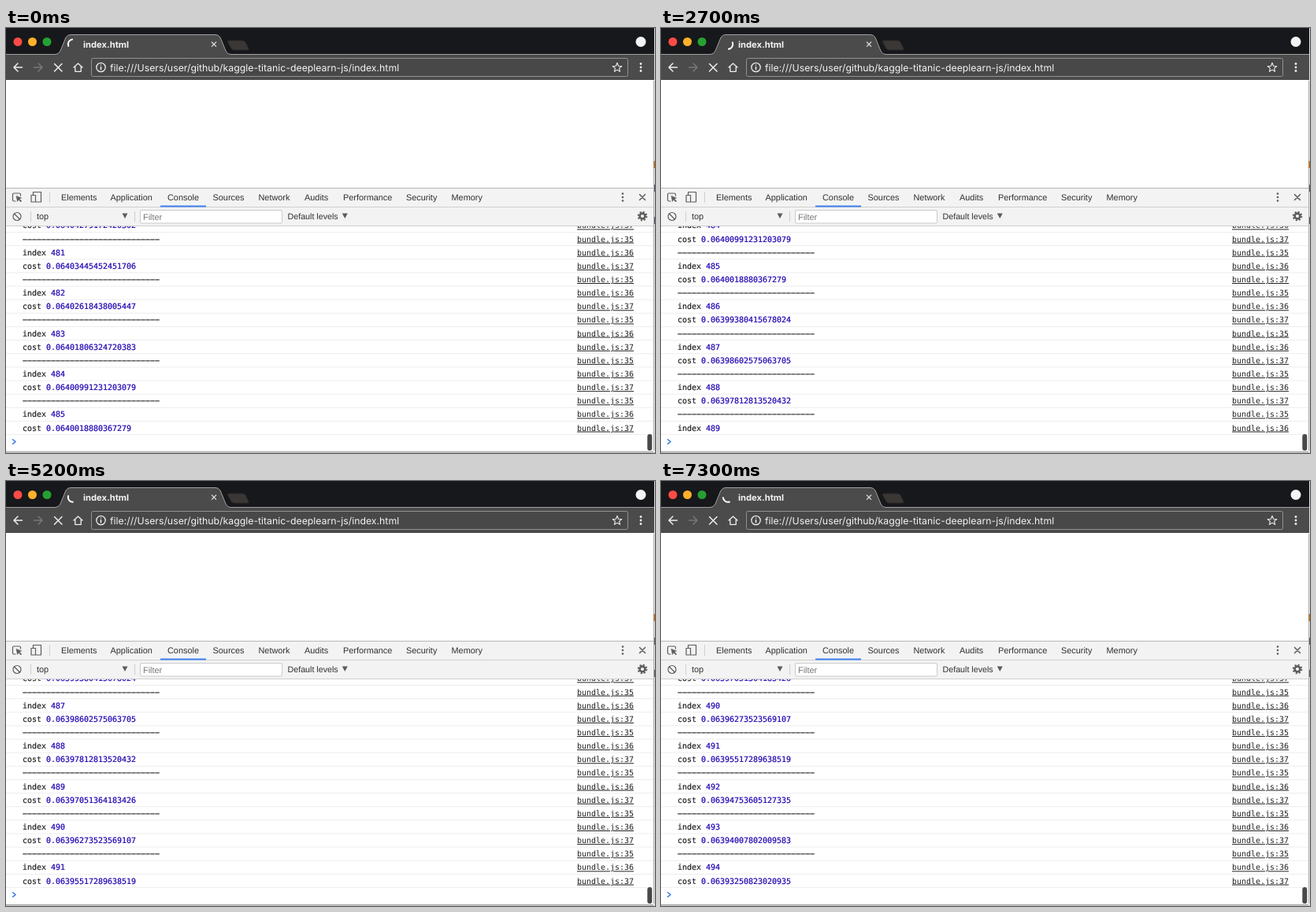
Write an HTML page that moves like this. It is 824 px wide and 540 px high and loops after 7.4 s.

```html
<!DOCTYPE html>
<html lang="en">
<head>
<meta charset="utf-8">
<title>index.html</title>
<style>
  html, body { margin: 0; width: 100%; height: 100%; overflow: hidden; background: #fff; }
  svg { display: block; }
  text { font: 10.9px "Liberation Sans", Arial, sans-serif; fill: #303030; white-space: pre; text-rendering: geometricPrecision; }
  .chrome { font-family: Inter, Roboto, sans-serif; fill: #f4f4f4; }
  .title { font-size: 11.2px; font-weight: 700; }
  .url { font-size: 12.3px; }
  #rows text { font: 9.97px "DejaVu Sans Mono", "Liberation Mono", monospace; fill: #222; stroke: #222; stroke-width: .2px; }
  #rows .number { fill: #1c00b0; stroke: #1c00b0; }
  #rows .link { text-decoration: underline; stroke: none; }
  .line { fill: none; stroke-linecap: round; stroke-linejoin: round; }
</style>
</head>
<body>
<svg width="824" height="540" viewBox="0 0 824 540">
  <rect width="824" height="540" fill="#fff"/>

  <!-- Title bar and tab -->
  <rect width="823" height="34" fill="#17181b"/>
  <rect y="33" width="823" height="33" fill="#4b4b4b"/>
  <path d="M0 33.500H63Q67 33 69 29L76 12Q78 8.500 82 8.500H266Q270 8.500 272 12L279 29Q281 33.500 285 33.500H823" fill="#4b4b4b" stroke="#a0a0a0"/>
  <path d="M66 34H283" stroke="#4b4b4b" stroke-width="2"/>
  <path d="M283 16H300Q303 16 304 18L308 26Q309 28 306 28H290Q287 28 286 26L281.500 18Q281 16 283 16Z" fill="#3b3735" stroke="#2a2828"/>
  <circle cx="15" cy="17.500" r="5.500" fill="#fc4b46"/>
  <circle cx="33.500" cy="17.500" r="5.500" fill="#fdb12b"/>
  <circle cx="52" cy="17.500" r="5.500" fill="#25a032"/>
  <path id="spinner" class="line" d="M80.150 16.740A6.200 6.200 0 0 1 89.850 16.740" stroke="#fff" stroke-width="2"/>
  <text class="chrome title" x="98" y="24.500">index.html</text>
  <path class="line" d="M261.300 18l5.400 5.400m0-5.400l-5.400 5.400" stroke="#ddd" stroke-width="1.200"/>
  <circle cx="806" cy="17.500" r="6.500" fill="#f4f4f4"/>

  <!-- Navigation bar -->
  <rect x="108.500" y="38.500" width="681" height="23" rx="2" fill="#484848" stroke="#929292"/>
  <g class="line" stroke="#eee" stroke-width="1.500">
    <path d="M20.500 50H10M15 45l-5 5 5 5"/>
    <path d="M35.500 50H46M41 45l5 5-5 5" stroke="#777"/>
    <path d="M61.500 45.500l9.500 9.500m0-9.500l-9.500 9.500"/>
    <path d="M86 50L91.500 45 97 50M87.800 49V55.300H95.200V49" stroke-width="1.300"/>
    <circle cx="120.500" cy="50" r="5.700" stroke-width="1.300"/>
    <path d="M120.500 49.500v3.300M120.500 47v.1"/>
    <path d="M776 44.300l1.600 3.900 4.200.300-3.200 2.700 1 4.100-3.600-2.200-3.600 2.200 1-4.100-3.200-2.700 4.200-.300Z" stroke-width="1.100"/>
  </g>
  <text class="chrome url" x="132" y="54.600">file:///Users/user/github/kaggle-titanic-deeplearn-js/index.html</text>
  <g fill="#eee"><circle cx="806" cy="45.500" r="1.400"/><circle cx="806" cy="50" r="1.400"/><circle cx="806" cy="54.500" r="1.400"/></g>

  <!-- Developer tools bars -->
  <rect y="203" width="822" height="49" fill="#f3f3f3"/>
  <path d="M0 203.500H822" stroke="#b5b5b5"/>
  <path d="M0 227.500H822M0 251.500H822M55.500 208V222M31.500 233V246M163.500 233V246" stroke="#cfcfcf"/>
  <rect x="196" y="225.500" width="58" height="2" fill="#3e82f1"/>
  <g class="line" stroke="#5c5c5c" stroke-width="1.200">
    <path d="M12 220H10Q8.500 220 8.500 218.500V211.500Q8.500 210 10 210H17Q18.500 210 18.500 211.500V213"/>
    <path d="M13 213.500l1.500 7 1.500-2.300 2.800 2.800 1-1-2.800-2.800 2.500-1.200Z" fill="#5c5c5c" stroke-width=".5"/>
    <path d="M34.500 212V208.500H44.500V221H38M32 212.500H37.500V221H32Z"/>
    <path d="M804.500 211.500l7 7m0-7l-7 7" stroke-width="1.500"/>
    <circle cx="14" cy="239.500" r="5"/><path d="M10.500 236l7 7"/>
    <circle cx="808" cy="239" r="3.400" stroke-width="2.600"/>
    <circle cx="808" cy="239" r="5.300" stroke-width="2" stroke-dasharray="2.080 2.080" style="stroke-linecap:butt"/>
  </g>
  <g fill="#5c5c5c">
    <circle cx="783" cy="210.500" r="1.300"/><circle cx="783" cy="215" r="1.300"/><circle cx="783" cy="219.500" r="1.300"/>
    <path d="M147.500 235.500h7l-3.500 6.500ZM426.800 235.500h7l-3.500 6.500Z"/>
  </g>
  <g id="tabs"></g>
  <rect x="170.500" y="231.500" width="180" height="16.500" rx="1.500" fill="#fff" stroke="#cbcbcb"/>
  <text x="39" y="243">top</text>
  <text x="174" y="243.500" style="fill:#777">Filter</text>
  <text x="357.500" y="243" style="font-size:10.700px">Default levels</text>

  <!-- Console -->
  <svg y="252" width="822" height="265.500" viewBox="0 252 822 265.500"><g id="rows"></g></svg>
  <path class="line" d="M8.500 522.800l3.600 2.800-3.600 2.800" stroke="#3b78e7" stroke-width="1.400"/>
  <rect id="thumb" x="814.300" y="516" width="6" height="21" rx="3"/>

  <!-- Window edges -->
  <path d="M822.500 67V537" stroke="#aaa"/>
  <path d="M823.500 0V540" stroke="#e4e4e4"/>
  <path d="M823 169V178" stroke="#b57a3d" stroke-width="2"/>
  <path d="M823.500 199V208M823.500 240V249" stroke="#555a70"/>
  <path d="M0 538.500H822" stroke="#999"/>
  <path d="M0 539.500H824" stroke="#cfcfcf"/>
</svg>
<script>
const LOOP = 7400, TICK = 100;
const ROW_HEIGHT = 17.143, LAST_BASELINE = 511.6;
const STEP = 855, STEP_OFFSET = 620, INDEX_LEAD = 140;
const SPIN = 1080;
const FIRST_INDEX = 480, START_INDEX = 485;
const costs = `0.06404279172420302 0.06403445452451706 0.06402618438005447
  0.06401806324720383 0.06400991231203079 0.0640018880367279 0.06399380415678024
  0.06398602575063705 0.06397812813520432 0.06397051364183426 0.06396273523569107
  0.06395517289638519 0.06394753605127335 0.06394007802009583 0.06393250823020935`.split(/\s+/);

const byId = id => document.getElementById(id);

function add(parent, tag, attributes, text = "") {
  const node = document.createElementNS("http://www.w3.org/2000/svg", tag);
  for (const name in attributes) node.setAttribute(name, attributes[name]);
  node.textContent = text;
  return parent.appendChild(node);
}

const tabs = { Elements: 70, Application: 132.5, Console: 205, Sources: 262.5, Network: 320.5,
  Audits: 379, Performance: 428, Security: 508, Memory: 565.5 };
for (const name in tabs) add(byId("tabs"), "text", { x: tabs[name], y: 218.7 }, name);

function addRow(position, label, value, line) {
  const y = position * ROW_HEIGHT;
  const rows = byId("rows");
  const text = add(rows, "text", { x: 21, y }, label);
  add(text, "tspan", { class: "number" }, value);
  add(rows, "text", { x: 725, y, class: "link" }, "bundle.js:" + line);
  add(rows, "path", { d: `M0 ${y + 5}H822`, stroke: "#ededed" });
}

// Minus signs give the separator its wide dashes.
costs.forEach((cost, i) => {
  addRow(3 * i, "\u2212".repeat(29), "", 35);
  addRow(3 * i + 1, "index ", FIRST_INDEX + i, 36);
  addRow(3 * i + 2, "cost ", cost, 37);
});

// The index of the next step is logged shortly before its cost.
function lastRow(time) {
  const elapsed = time + STEP_OFFSET;
  const finished = START_INDEX - FIRST_INDEX + Math.floor(elapsed / STEP);
  const remaining = STEP - elapsed % STEP;
  return 3 * finished + 2 + (remaining <= INDEX_LEAD ? 2 : 0);
}

function draw(now) {
  const time = Math.floor(now % LOOP / TICK) * TICK;
  const scroll = LAST_BASELINE - lastRow(time) * ROW_HEIGHT;
  byId("rows").setAttribute("transform", `translate(0 ${scroll})`);
  byId("spinner").setAttribute("transform", `rotate(${300 + time / SPIN * 360} 85 20.6)`);
  byId("thumb").setAttribute("fill", time >= 800 && time < 1000 ? "#c2c2c2" : "#484848");
}

function frame() {
  draw(performance.now());
  requestAnimationFrame(frame);
}
frame();
</script>
</body>
</html>
```
